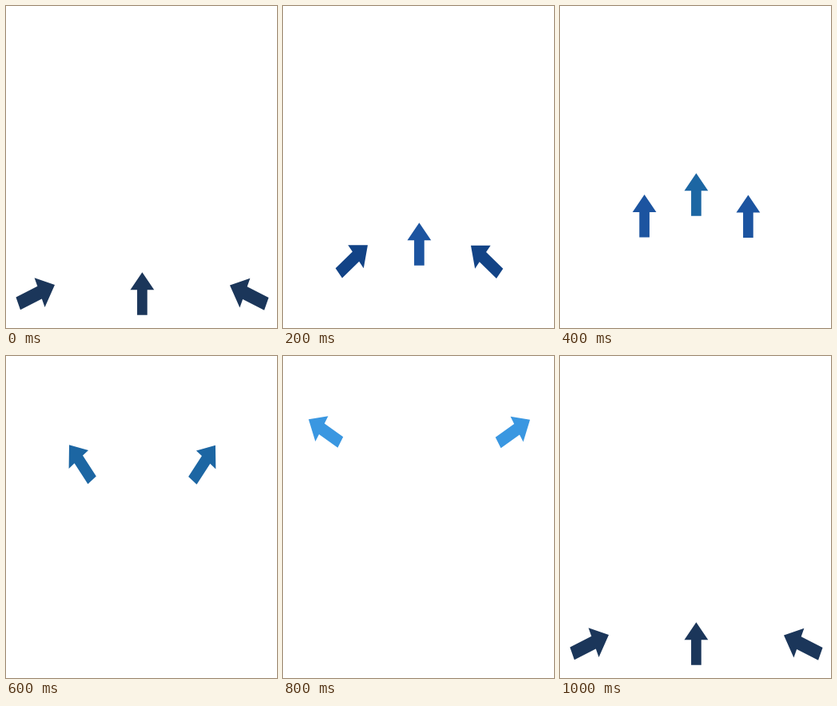
Animation of 339 by 403 pixels, one loop 1200 ms. Source, as an HTML page:

```html
<!DOCTYPE html>
<html lang="en">
<head>
<meta charset="utf-8">
<title>Arrows</title>
<style>
  html, body { margin: 0; width: 100%; height: 100%; overflow: hidden; background: #fff; }
  svg { display: block; width: 100%; height: 100%; }
</style>
</head>
<body>
<svg viewBox="0 0 339 403">
  <defs>
    <!-- Points up, with its tip at the origin -->
    <path id="arrow" d="M0 0 L15.5 19.2 H6.6 V46.5 H-6.6 V19.2 H-15.5 Z"/>
  </defs>
  <use id="mid" href="#arrow"/>
  <use id="left" href="#arrow"/>
  <g transform="translate(341 .5) scale(-1 1)"><use id="right" href="#arrow"/></g>
</svg>
<script>
const STEP = 200, STEPS = 6;
const navy = '#1b365a', deep = '#124386', royal = '#1c54a0', teal = '#1c66a3', sky = '#3a97e1';

const midColors = [navy, royal, teal];
const sides = [
  { x: 61, y: 349, angle: 67, size: 1.07, color: navy },
  { x: 106, y: 299.2, angle: 51, size: 1, color: deep },
  { x: 105.6, y: 236, angle: 0, size: 0.96, color: royal },
  { x: 79, y: 111.3, angle: -38, size: 1, color: teal },
  { x: 32, y: 79.3, angle: -59, size: 1, color: sky }
];

// All arrows are stretched vertically after being turned
function place(id, { x, y, angle, size, color }) {
  const use = document.getElementById(id);
  use.setAttribute('transform',
    `translate(${x} ${y}) scale(1 1.2) rotate(${angle}) scale(${size})`);
  use.setAttribute('fill', color);
}

function draw(now) {
  // The last step already shows the starting pose again
  const i = Math.floor(now / STEP) % STEPS % sides.length;
  place('mid', { x: 170.4, y: 333.2 - 62 * i, angle: 0, size: 0.96, color: midColors[i] || 'none' });
  place('left', sides[i]);
  place('right', sides[i]);
  requestAnimationFrame(draw);
}

draw(0);
</script>
</body>
</html>
```
